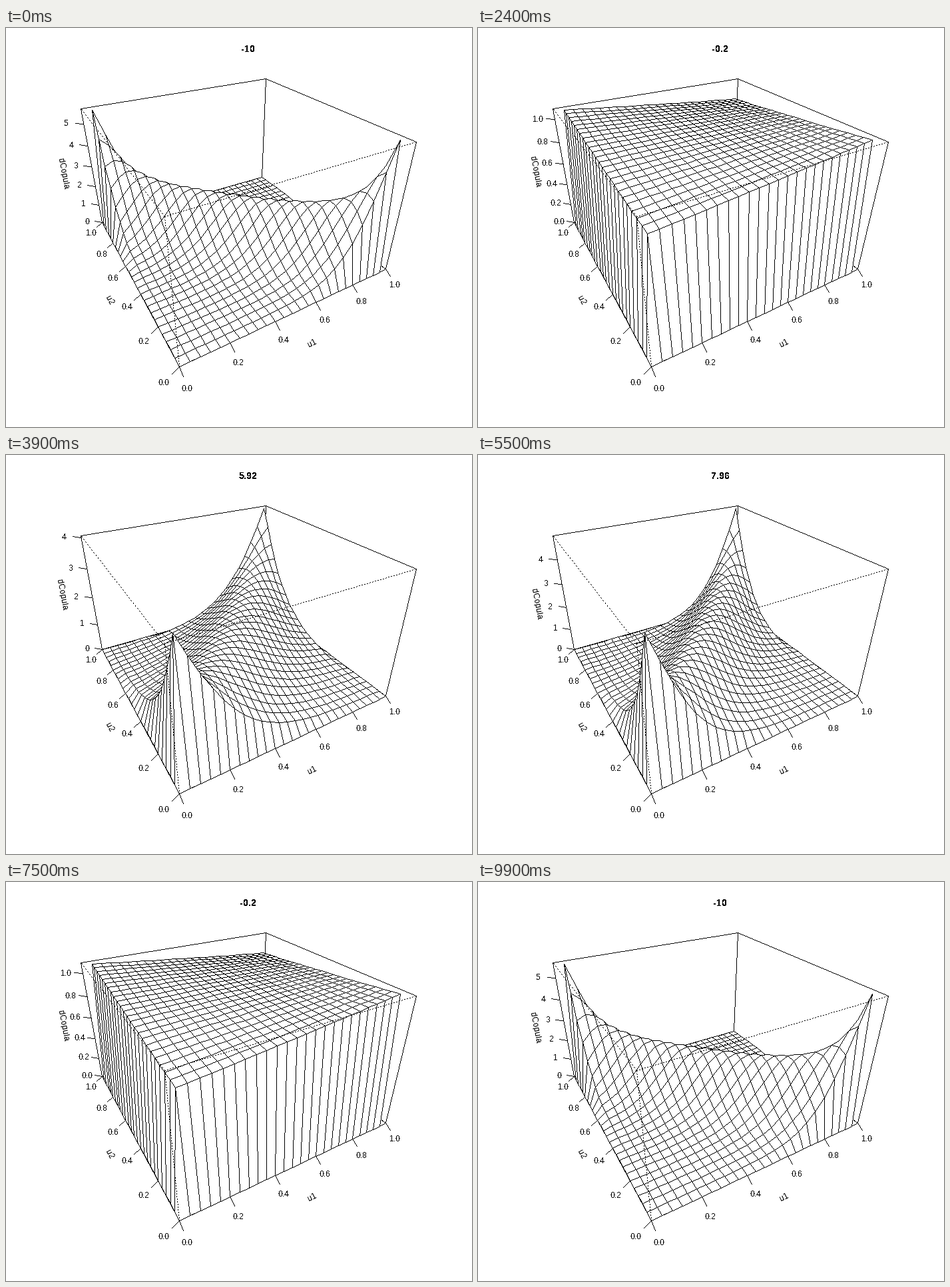
A matplotlib script that plays this animation: 700 by 600 pixels, repeating every 10 s.

```python
import numpy as np
import matplotlib as mpl
import matplotlib.pyplot as plt
from matplotlib.animation import FuncAnimation

W, H, DPI = 700, 600, 100
PX = 72 / DPI                      # points per pixel
STEPS = 50
GRID = np.linspace(0, 1, 26)
TICK = 0.03                        # tick length as a share of the axis

mpl.rcParams.update({
    "font.family": "Liberation Sans",
    "text.hinting": "native",
    "text.hinting_factor": 1,
    "text.antialiased": False,
    "axes.unicode_minus": False,
})


# ---- perspective ---------------------------------------------------------

ANGLE = PHI = np.radians(30)
EXPAND = 0.618
EYE = np.sqrt(3) + 2


def view(x, y, z):
    """Project points of the unit cube onto the view plane."""
    x, y, z = 2 * x - 1, 2 * y - 1, EXPAND * (2 * z - 1)
    across = x * np.cos(ANGLE) - y * np.sin(ANGLE)
    near = -x * np.sin(ANGLE) - y * np.cos(ANGLE)
    up = z * np.cos(PHI) - near * np.sin(PHI)
    w = EYE - z * np.sin(PHI) - near * np.cos(PHI)
    return np.stack(np.broadcast_arrays(across / w, up / w), axis=-1)


# The box is centred in the plot region, whose height sets the scale.
LINE = 14.4
LEFT, RIGHT = 4.1 * LINE, W - 2.1 * LINE
TOP, BOTTOM = 4.1 * LINE, H - 5.1 * LINE
CORNERS = np.array([[i, j, k] for i in (0, 1) for j in (0, 1) for k in (0, 1)])
extent = view(*CORNERS.T)
lo, hi = extent.min(axis=0), extent.max(axis=0)
SCALE = (BOTTOM - TOP) / 1.08 / (hi - lo)[1]
MID = (lo + hi) / 2


def project(x, y, z):
    p = (view(x, y, z) - MID) * SCALE
    return np.array([(LEFT + RIGHT) / 2, (TOP + BOTTOM) / 2]) + p * [1, -1]


def pixel(x, y, z):
    return np.floor(project(x, y, z)).astype(int)


def segment(a, b):
    return pixel(*a), pixel(*b)


# ---- hard-edged raster ---------------------------------------------------
# Each helper returns, for every pixel, the index of its shape and the place.

def runs(counts):
    """Flatten runs of the given lengths into owner and step arrays."""
    owner = np.repeat(np.arange(len(counts)), counts)
    return owner, np.arange(len(owner)) - (np.cumsum(counts) - counts)[owner]


def line_pixels(a, b):
    d = b - a
    n = np.abs(d).max(axis=1)
    owner, step = runs(n + 1)
    t = step / np.maximum(n, 1)[owner]
    p = np.floor(a[owner] + d[owner] * t[:, None] + 0.5).astype(int)
    return owner, step, p[:, 0], p[:, 1]


def fill_pixels(quads):
    """Even-odd scanline fill of all quads at once."""
    top = quads[:, :, 1].min(axis=1)
    owner, step = runs(quads[:, :, 1].max(axis=1) - top)
    y = top[owner] + step
    a = quads[owner]
    d = np.roll(a, -1, axis=1) - a
    gap = y[:, None] - a[:, :, 1]
    dy = d[:, :, 1]
    hit = (gap >= np.minimum(dy, 0)) & (gap < np.maximum(dy, 0))
    cross = a[:, :, 0] + gap * d[:, :, 0] / np.where(dy == 0, 1, dy)
    cross = np.sort(np.where(hit, cross, np.inf), axis=1).reshape(-1, 2)
    used = np.isfinite(cross[:, 1])
    owner, y = np.repeat(owner, 2)[used], np.repeat(y, 2)[used]
    start, stop = np.ceil(cross[used] - 1e-9).astype(int).T
    span, step = runs(stop - start)
    return owner[span], start[span] + step, y[span]


def stack(segments):
    a, b = zip(*segments)
    return np.array(a), np.array(b)


# ---- surface -------------------------------------------------------------

def density(theta):
    """Frank copula density on the grid, zero on the border."""
    u, v = np.meshgrid(GRID, GRID, indexing="ij")
    g = -np.expm1(-theta)
    bottom = g - np.expm1(-theta * u) * np.expm1(-theta * v)
    z = theta * g * np.exp(-theta * (u + v)) / bottom ** 2
    z[[0, -1], :] = 0
    z[:, [0, -1]] = 0
    return z


far_u, far_v = np.meshgrid(GRID[1:], GRID[1:], indexing="ij")
ORDER = np.argsort(-(far_u * np.sin(ANGLE) + far_v * np.cos(ANGLE)).ravel())


def facets(z):
    """Grid cells as quads, farthest first."""
    p = pixel(GRID[:, None], GRID[None, :], z)
    quads = np.stack([p[:-1, :-1], p[1:, :-1], p[1:, 1:], p[:-1, 1:]], axis=2)
    return quads.reshape(-1, 4, 2)[ORDER]


def pretty_ticks(top, n=4):
    cell = top / n
    base = 10.0 ** np.floor(np.log10(cell))
    unit = base
    for mult, bias in ((2, 0.8), (5, 1.7), (10, 0.8)):
        if mult * base - cell < bias * (cell - unit):
            unit = mult * base
    count = int(np.floor(top / unit + 1e-7))
    fmt = "{:.0f}" if unit > 0.99 else "{:.1f}"
    return unit * np.arange(count + 1), fmt


# ---- stage ---------------------------------------------------------------

fig = plt.figure(figsize=(W / DPI, H / DPI), dpi=DPI, facecolor="white")
ax = fig.add_axes([0, 0, 1, 1])
image = ax.imshow(np.full((H, W), 255, np.uint8), cmap="gray", vmin=0,
                  vmax=255, extent=(0, W, H, 0), interpolation="nearest",
                  aspect="auto")
ax.set_axis_off()


def add_text(text="", size=12, **style):
    return ax.text(0, 0, text, fontsize=size * PX, ha="center", va="baseline",
                   rotation_mode="anchor", **style)


def place(label, point, angle=0, drop=5.5):
    """Centre a label on a point, its baseline a little below it."""
    a = np.radians(angle)
    label.set_position((point[0] - 0.5 + drop * np.sin(a),
                        np.round(point[1] + drop * np.cos(a))))
    label.set_rotation(angle)


def slope(a, b):
    """Text angle along an edge, always read from left to right."""
    (x1, y1), (x2, y2) = sorted([tuple(project(*a)), tuple(project(*b))])
    return np.degrees(np.arctan2(y1 - y2, x2 - x1))


def outward(start, direction, k):
    return np.array(start) + k * TICK * np.array(direction)


edges = [(a, b) for i, a in enumerate(CORNERS) for b in CORNERS[i + 1:]
         if np.abs(a - b).sum() == 1]
front = np.array([0, 0, 1])
back_lines, front_lines = [], []
for a, b in edges:
    is_front = (a == front).all() or (b == front).all()
    (front_lines if is_front else back_lines).append(segment(a, b))

# Horizontal axes with their ticks and names.
X_OUT, Y_OUT, Z_OUT = (0, -1, -1), (-1, 0, -1), (-1, 1, 0)
for axis, out, name in ((0, X_OUT, "u1"), (1, Y_OUT, "u2")):
    unit = np.eye(3)[axis]
    for value in np.arange(6) / 5:
        at = value * unit
        back_lines.append(segment(at, outward(at, out, 1)))
        place(add_text(f"{value:.1f}"), project(*outward(at, out, 2)))
    place(add_text(name), project(*outward(unit / 2, out, 3.5)),
          slope((0, 0, 0), unit))

z_labels = [add_text() for _ in range(9)]
z_name = add_text("dCopula")
z_angle = slope((0, 1, 0), (0, 1, 1))

title = add_text(size=14, weight="bold")
title.set_position(((LEFT + RIGHT) / 2 - 0.5, 36))

ax.set_xlim(0, W)
ax.set_ylim(H, 0)


def paint(quads, lines):
    """Lines first, then white facets with black outlines, then dots."""
    fill = np.zeros((H, W), int)
    edge = np.full((H, W), -1)

    _, _, x, y = line_pixels(*stack(lines))
    edge[y, x] = 0
    owner, x, y = fill_pixels(quads)
    fill[y, x] = owner + 1
    owner, _, x, y = line_pixels(quads.reshape(-1, 2),
                                 np.roll(quads, -1, axis=1).reshape(-1, 2))
    edge[y, x] = owner // 4 + 1

    ink = edge >= fill
    _, step, x, y = line_pixels(*stack(front_lines))
    on = step % 4 < 2
    ink[y[on], x[on]] = True
    return np.where(ink, 0, 255).astype(np.uint8)


def update(frame):
    step = min(frame, 2 * STEPS - 1 - frame)
    theta = -10 + 20 * step / (STEPS - 1)
    z = density(theta)
    top = z.max()
    title.set_text(f"{round(theta, 2):g}")

    values, fmt = pretty_ticks(top)
    points = [np.array([0, 1, v / top]) for v in values]
    z_ticks = [segment(p, outward(p, Z_OUT, 1)) for p in points]
    image.set_data(paint(facets(z / top), back_lines + z_ticks))

    for label in z_labels:
        label.set_text("")
    for label, p, v in zip(z_labels, points, values):
        label.set_text(fmt.format(v))
        place(label, project(*outward(p, Z_OUT, 2)))
    middle = (0, 1, values[-1] / 2 / top)
    place(z_name, project(*outward(middle, Z_OUT, 3.5)), z_angle, drop=8)
    return image, title, z_name, *z_labels


anim = FuncAnimation(fig, update, frames=2 * STEPS, interval=100,
                     repeat=True, repeat_delay=0, blit=False)
plt.show()
```
